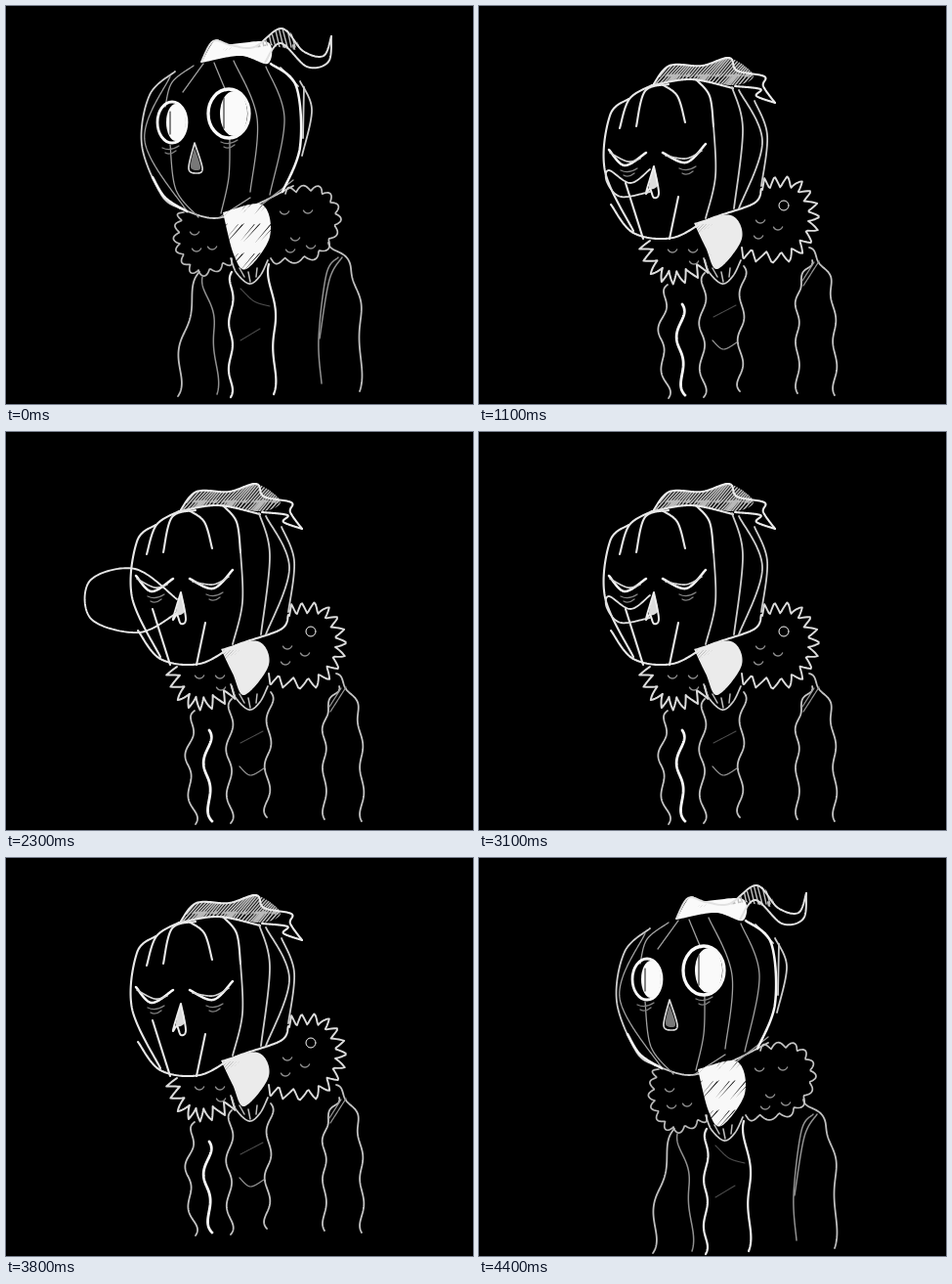
Animation of 478 by 407 pixels, one loop 5000 ms. Source, as an HTML page with a canvas:

```html
<!DOCTYPE html>
<html lang="en">
<head>
<meta charset="utf-8">
<title>Sleepy pumpkin</title>
<style>
  html, body { margin: 0; width: 100%; height: 100%; overflow: hidden; background: #000; }
  canvas { display: block; }
</style>
</head>
<body>
<canvas id="stage" width="478" height="407"></canvas>
<script>
const ctx = document.getElementById('stage').getContext('2d');
const LOOP = 5000;
const gray = v => `rgb(${v},${v},${v})`;

// Edge profiles that can ride on a curve
const flat = () => 0;
const wave = u => Math.sin(u * Math.PI * 2);
const scallop = u => Math.abs(Math.sin(u * Math.PI));
const tooth = u => { const f = u % 1; return f < .6 ? f / .6 : (1 - f) / .4; };

function spline(p, t) {
  const i = Math.min(Math.floor(t * (p.length - 1)), p.length - 2);
  const u = t * (p.length - 1) - i;
  const b = p[i], c = p[i + 1], a = p[i - 1] || b, d = p[i + 2] || c;
  return [0, 1].map(k => b[k] + u / 2 * (c[k] - a[k]
    + u * (2 * a[k] - 5 * b[k] + 4 * c[k] - d[k] + u * (3 * (b[k] - c[k]) + d[k] - a[k]))));
}

// Smooth path through the points, pushed sideways by a repeated profile
function trace(text, profile = flat, size = 0, repeats = 0) {
  const p = text.match(/\d+ \d+/g).map(pair => pair.split(' ').map(Number));
  const steps = 120;
  ctx.beginPath();
  for (let i = 0; i <= steps; i++) {
    const t = i / steps, [x, y] = spline(p, t);
    const [ax, ay] = spline(p, Math.max(t - .01, 0)), [bx, by] = spline(p, Math.min(t + .01, 1));
    const push = size * profile(t * repeats) / (Math.hypot(bx - ax, by - ay) || 1);
    ctx.lineTo(x - (by - ay) * push, y + (bx - ax) * push);
  }
}

function ink(width, shade) {
  ctx.lineWidth = width;
  ctx.strokeStyle = gray(shade);
  ctx.stroke();
}

function pen(width, shade, ...paths) {
  for (const path of paths) { trace(path); ink(width, shade); }
}

function edge(width, shade, path, profile, size, repeats) {
  trace(path, profile, size, repeats);
  ink(width, shade);
}

function blob(shade, path) {
  trace(path);
  ctx.fillStyle = gray(shade);
  ctx.fill();
}

function oval(x, y, rx, ry, width) {
  ctx.beginPath();
  ctx.ellipse(x, y, rx, ry, 0, 0, Math.PI * 2);
  if (width) return ink(width, 250);
  ctx.fillStyle = gray(250);
  ctx.fill();
}

// Pencil shading inside an outline
function hatch(path, gap, width, shade, slant = 14) {
  ctx.save();
  trace(path);
  ctx.clip();
  ctx.beginPath();
  for (let x = 160; x < 320; x += gap) {
    const wobble = 2 * Math.sin(x * 2.3);
    for (let y = 10; y < 300; y += 30) {
      ctx.moveTo(x + slant + wobble, y);
      ctx.lineTo(x - slant, y + 32);
    }
  }
  ink(width, shade);
  ctx.restore();
}

// Small curls inside the fur, or tired folds below an eye
function curls(...spots) {
  for (const [x, y] of spots) {
    ctx.beginPath();
    ctx.arc(x, y, 5, .4, 2.7);
    ink(1.3, 145);
  }
}

function bags(x, y, otherX, otherY) {
  for (const [left, top] of [[x, y], [otherX, otherY]]) {
    for (const k of [0, 1]) {
      ctx.beginPath();
      ctx.moveTo(left + 3 * k, top + 5 * k);
      ctx.quadraticCurveTo(left + 8, top + 4 + 4 * k, left + 17 - 3 * k, top - 2 + 5 * k);
      ink(1.3, 130);
    }
  }
}

function neckline() {
  pen(1.7, 205, '230 258 236 273 249 284 260 276 268 260');
  for (let i = 0; i < 3; i++) {
    ctx.beginPath();
    ctx.moveTo(239 + i * 9, 268 + i % 2 * 4);
    ctx.lineTo(244 + i * 6, 277 + i % 2 * 5);
    ink(1.5, 190);
  }
}

function drawAwake() {
  hatch('200 58 214 35 228 39 268 37 268 59 240 51 200 58', 2.6, 2.3, 250);
  hatch('255 43 284 23 300 44 270 40', 4, 1.4, 190, -4);
  pen(2, 225, '200 57 212 36 230 40 254 42 282 23 304 46 325 51 333 31',
      '333 31 330 57 308 62 281 38 265 58');
  // Pumpkin
  pen(1.8, 205, '173 67 147 91 139 142 159 193 178 207', '178 207 214 217 254 204 294 184',
      '281 63 299 82', '301 77 313 106 303 153', '305 83 304 135');
  pen(1.3, 160, '168 72 142 138 186 211', '192 61 170 78 163 103', '202 59 181 88',
      '213 58 225 87', '168 142 174 188 197 216', '229 135 228 175 220 212',
      '233 56 257 115 250 190', '266 62 285 115 270 193', '219 216 250 196', '262 203 294 178');
  pen(2.5, 245, '271 59 297 82 301 144 283 190', '150 175 163 196 185 210');
  // Face
  oval(170, 119, 15, 21, 2.8);
  oval(174, 119, 10, 19);
  oval(228, 110, 21, 25, 3.3);
  oval(233, 110, 14, 23);
  pen(1.1, 35, '168 108 168 131', '223 94 223 125');
  bags(160, 145, 220, 139);
  blob(120, '193 145 189 165 199 166 193 145');
  pen(1.7, 220, '193 140 187 166 195 171 201 166 193 140');
  // Collar
  hatch('222 211 262 203 270 236 246 269 233 254 222 211', 3.3, 2.9, 248);
  edge(1.7, 185, '182 211 178 243 197 270 231 258', scallop, 6, 9);
  edge(1.7, 195, '286 192 321 191 337 218 317 252 271 258', scallop, -6, 11);
  curls([193, 229], [195, 246], [211, 244], [285, 208], [309, 207], [296, 235], [291, 247], [312, 243]);
  neckline();
  // Coat
  edge(1.8, 190, '198 272 182 335 176 399', wave, 3, 2);
  edge(1.5, 145, '201 277 213 330 216 397', wave, 2, 2);
  edge(2.2, 240, '231 272 230 335 230 400', wave, 2, 3);
  edge(2.2, 240, '269 264 275 330 274 397', wave, 2, 2);
  edge(1.8, 190, '330 242 353 268 363 320 362 394', wave, 2, 3);
  pen(1.5, 145, '340 257 328 274 320 340 323 386', '344 257 331 280 321 340');
  pen(1.1, 75, '240 289 254 302 270 307', '240 342 260 330');
}

function drawGrumpy() {
  blob(250, '200 58 223 33 249 42 282 36 272 59 240 52 200 58');
  hatch('207 56 224 39 272 44 239 50 207 56', 9, .7, 60);
  pen(2.1, 248, '265 40 297 30 303 23 313 18 320 33 336 41', '336 41 318 45 306 32 297 41 279 43 268 60');
  // Pumpkin
  pen(2.4, 245, '173 71 149 94 143 150 161 199 182 213', '181 210 212 220 250 208 284 191 298 171');
  pen(1.8, 215, '203 58 175 69 161 108', '197 64 181 89', '211 57 224 77 229 105',
      '235 54 255 75 261 148 250 202', '263 58 285 92 284 154 261 201',
      '276 62 299 86 303 145 282 189', '298 72 315 112 298 166');
  pen(1.5, 175, '170 143 172 180 180 207', '230 146 217 219');
  pen(2.5, 248, '222 174 218 219');
  // Face
  blob(250, '162 124 187 124 180 140 168 141 162 124');
  blob(250, '218 125 257 115 243 137 227 137 218 125');
  pen(2.6, 250, '153 120 164 123 188 124', '205 122 230 123 258 115',
      '153 120 158 138 171 143 184 138 188 124', '206 122 221 137 246 136 258 115');
  bags(160, 147, 222, 142);
  blob(235, '195 146 191 162 199 162 195 146');
  pen(1.8, 230, '195 146 188 171 194 166 201 172 195 146');
  // Collar
  blob(248, '222 214 262 201 268 234 247 272 228 247 222 214');
  hatch('229 219 260 207 265 236 248 267 229 219', 11, .8, 45, 7);
  edge(1.8, 190, '184 213 183 246 200 267 230 262', tooth, 9, 9);
  edge(1.8, 205, '288 188 322 191 336 223 315 251 272 258', tooth, -9, 13);
  curls([197, 222], [195, 241], [213, 237], [226, 249], [282, 232], [308, 237]);
  neckline();
  // Coat
  edge(2.2, 240, '196 280 183 340 177 398', wave, 4, 3);
  edge(2.2, 240, '231 270 231 335 231 400', wave, 3, 4);
  edge(2.2, 240, '271 265 275 330 276 398', wave, -3, 3);
  edge(2.2, 240, '214 308 215 350 215 396', wave, 2, 2);
  edge(2.2, 240, '346 256 359 310 362 390', wave, -3, 3);
  edge(1.8, 210, '343 254 329 280 323 344 322 394', wave, 2, 3);
  pen(1.8, 210, '335 242 352 261', '353 260 332 271');
  pen(1.4, 135, '203 277 212 307', '242 318 267 306', '237 342 246 350 264 355');
}

function drawAsleep() {
  hatch('179 80 195 61 228 61 256 53 281 71 261 81 217 75 179 80', 3, 1.6, 185);
  pen(2.1, 235, '178 81 195 61 228 61 256 53 264 66 292 72 291 82 303 99', '303 99 284 92 288 85 262 82');
  // Pumpkin
  pen(2.1, 232, '153 95 134 112 129 169 158 230', '177 81 154 95 144 125', '194 80 170 87 161 123',
      '187 80 203 92 211 119', '222 75 236 92 240 123', '178 81 217 75 260 84',
      '135 203 158 232 198 237 236 218 281 202 289 187', '150 181 168 238', '204 195 195 238');
  pen(1.8, 205, '240 121 242 174 232 217', '259 83 270 126 261 207',
      '266 86 290 139 266 207', '282 97 295 132 289 184');
  // Face
  pen(2.5, 248, '133 147 149 163 171 150', '188 150 212 160 232 141');
  pen(1.6, 215, '134 150 152 159 165 156', '191 153 212 156 228 148');
  bags(145, 168, 205, 166);
  blob(220, '179 164 174 186 183 183 179 164');
  pen(2, 238, '179 164 171 191 175 187 179 196 184 191 179 164');
  // Collar
  hatch('220 222 258 214 269 238 244 269 232 247 220 222', 2.8, 2.1, 235);
  edge(2, 220, '175 240 186 266 205 271 231 260', tooth, 13, 8);
  edge(1.9, 220, '290 188 323 188 337 220 315 250 269 247', tooth, -12, 14);
  curls([198, 247], [219, 247], [220, 259], [288, 217], [286, 233], [306, 224]);
  oval(312, 204, 5, 5, 1);
  neckline();
  // Coat
  edge(1.8, 195, '193 285 186 340 194 401', wave, 3, 3);
  edge(1.8, 195, '231 273 228 335 230 400', wave, 3, 3);
  edge(1.8, 195, '271 266 268 330 267 394', wave, -3, 3);
  edge(1.8, 195, '338 247 359 280 364 340 364 398', wave, -2, 4);
  edge(1.8, 195, '341 260 327 290 326 340 326 396', wave, -2, 4);
  edge(2.8, 250, '208 305 205 350 211 398', wave, -3, 2);
  pen(1.2, 150, '348 261 332 286', '343 262 331 281', '239 342 250 351 264 344');
  pen(1.1, 75, '240 318 263 306');
}

function drawSmallBubble() {
  pen(1.8, 225, '175 190 145 195 131 180 133 168 155 181 175 167');
}

function drawBigBubble() {
  pen(1.9, 230, '175 185 136 205 87 191 86 152 132 140 175 171');
}

function drawBurst() {
  ctx.beginPath();
  for (let i = 0; i < 10; i++) {
    const c = Math.cos(i * Math.PI / 5), s = Math.sin(i * Math.PI / 5);
    ctx.moveTo(115 + c * 43, 172 + s * 30);
    ctx.lineTo(115 + c * 62, 172 + s * 43);
  }
  ink(2, 225);
}

function sleep(time) {
  drawAsleep();
  const breath = (time - 1100) % 1000;
  if (time < 1100 || breath >= 600) return;
  if (breath >= 200 && breath < 400) drawBigBubble();
  else drawSmallBubble();
}

function drawAt(time) {
  if (time < 700) drawAwake();
  else if (time < 1000) drawGrumpy();
  else if (time < 3700) sleep(time);
  else if (time < 3800) { drawAsleep(); drawBurst(); }
  else if (time < 4100) { ctx.translate(0, -15); drawAsleep(); }
  else if (time < 4200) drawGrumpy();
  else {
    if (time >= 4300) ctx.translate(2, time < 4400 ? 9 : 5);
    drawAwake();
  }
}

ctx.lineCap = ctx.lineJoin = 'round';

function render() {
  ctx.fillStyle = gray(0);
  ctx.fillRect(0, 0, 478, 407);
  ctx.save();
  drawAt(performance.now() % LOOP);
  ctx.restore();
  requestAnimationFrame(render);
}
render();
</script>
</body>
</html>
```
